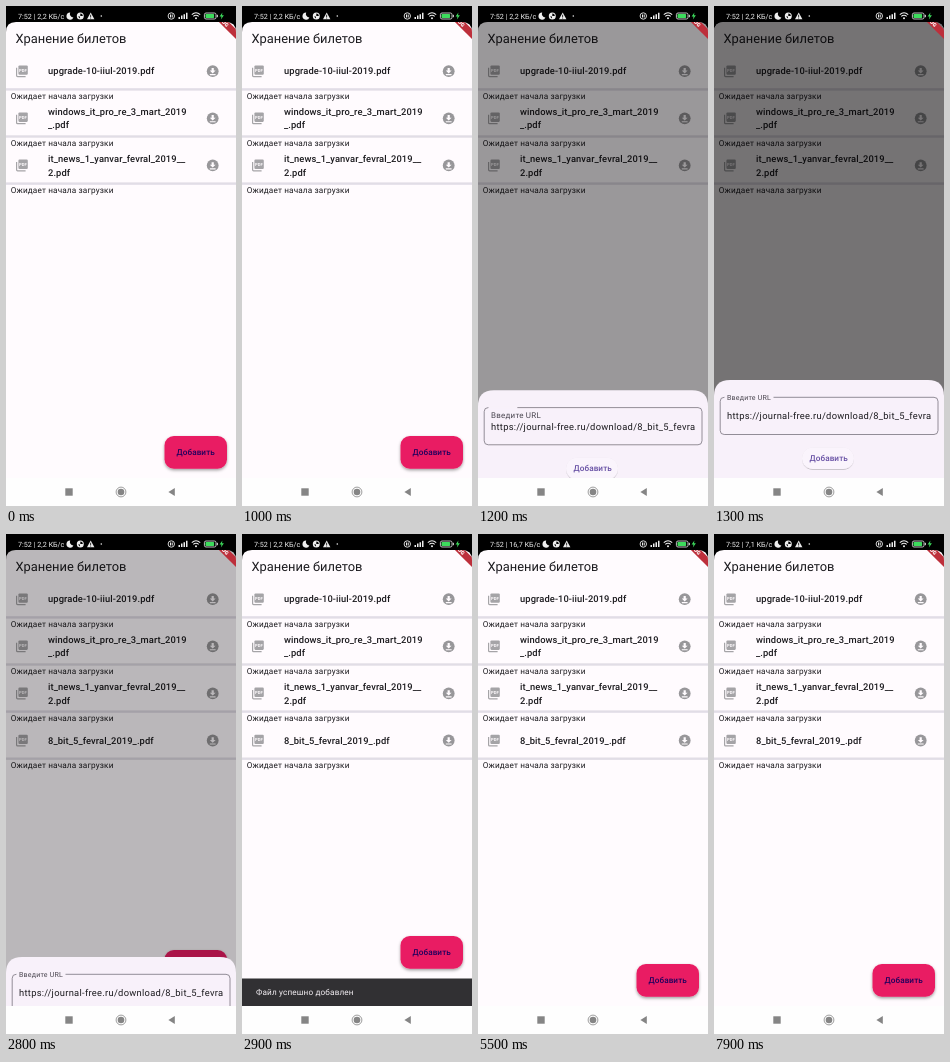
These frames come from a looping animation (230 px wide and 500 px high, 8000 ms). An HTML page:

```html
<!DOCTYPE html>
<html lang="ru">
<head>
<meta charset="utf-8">
<style>
html, body { margin: 0; width: 100%; height: 100%; overflow: hidden; background: #000; }
svg { display: block; width: 230px; height: 500px; }
text { font: 8.2px Roboto, sans-serif; letter-spacing: .15px; fill: #1c1b1f; white-space: pre; text-rendering: geometricPrecision; }
.title { font-size: 12.9px; letter-spacing: 0; }
.file { font-size: 9.36px; font-weight: 500; letter-spacing: .09px; }
.input { font-size: 9.36px; letter-spacing: .29px; }
.button { font-weight: 500; letter-spacing: .06px; text-anchor: middle; }
.clock { font-size: 7.2px; letter-spacing: 0; fill: #eee; }
.pdf { font-size: 4.2px; font-weight: 700; letter-spacing: 0; fill: #fffbfe; }
.debug { font-size: 5.2px; font-weight: 900; letter-spacing: 0; fill: #fff; text-anchor: middle; }
</style>
</head>
<body>
<svg viewBox="0 0 230 500">
  <defs>
    <clipPath id="screen"><path d="M0 472V26Q0 16 10 16H220Q230 16 230 26V472Z"/></clipPath>
    <clipPath id="inputClip"><rect x="12" y="392" width="206" height="36"/></clipPath>
    <filter id="shadow" x="-20%" y="-30%" width="140%" height="180%">
      <feDropShadow dx="0" dy="1.5" stdDeviation="1.6" flood-opacity=".38"/>
    </filter>
    <filter id="softShadow" x="-20%" y="-30%" width="140%" height="180%">
      <feDropShadow dx="0" dy=".6" stdDeviation=".7" flood-opacity=".3"/>
    </filter>
    <g id="pdfIcon">
      <rect x="12.4" y="-5.8" width="9.4" height="9.4" rx="1.1" fill="#a5a4a7"/>
      <path d="M10.6 -3.5V4.4Q10.6 5.4 11.6 5.4H19.6" fill="none" stroke="#a5a4a7" stroke-width="1.2"/>
      <text class="pdf" x="13.1" y=".5">PDF</text>
    </g>
    <g id="loadIcon">
      <circle r="5.9" fill="#98979a"/>
      <path d="M-1.1 -3.2H1.1V-.6H2.9L0 2.2L-2.9 -.6H-1.1ZM-2.9 2.9H2.9V4H-2.9Z" fill="#fffbfe"/>
    </g>
  </defs>

  <rect width="230" height="500" fill="#000"/>
  <rect y="472" width="230" height="28" fill="#fefefe"/>

  <g clip-path="url(#screen)">
    <rect y="16" width="230" height="456" fill="#fffbfe"/>
    <text class="title" x="9.5" y="37">Хранение билетов</text>
    <g id="list"></g>
    <g id="snack">
      <rect y="444.5" width="230" height="28" fill="#313033"/>
      <text x="14" y="461.3" style="fill:#f4eff4">Файл успешно добавлен</text>
    </g>
    <g id="fab">
      <rect x="158.5" y="430" width="62.5" height="32.7" rx="9.4" fill="#e91e63" filter="url(#shadow)"/>
      <text class="button" x="189.7" y="449.3" style="fill:#21005d">Добавить</text>
    </g>
    <rect id="scrim" y="16" width="230" height="456" fill="#000"/>
    <g id="sheet">
      <path d="M0 480V390Q0 374 16 374H214Q230 374 230 390V480Z" fill="#f8f1fa"/>
      <rect x="6.2" y="391.3" width="217.8" height="37.2" rx="4" fill="none" stroke="#79747e" stroke-width=".8"/>
      <rect id="gap" x="10.5" y="390" width="49" height="3" fill="#f8f1fa"/>
      <text class="input" x="13" y="413.3" clip-path="url(#inputClip)">https://journal-free.ru/download/8_bit_5_fevral</text>
      <text id="label" class="input" x="13" style="fill:#49454f">Введите URL</text>
      <rect x="88" y="441.5" width="52" height="21.5" rx="10.75" fill="#faf4fc" filter="url(#softShadow)"/>
      <text class="button" x="114.7" y="455" style="fill:#6750a4">Добавить</text>
    </g>
    <g transform="translate(230 0) rotate(45)">
      <rect x="-24" y="16.4" width="48" height="7" fill="#bd2f3b"/>
      <text class="debug" y="21.8">DEBUG</text>
    </g>
  </g>

  <text id="clock" class="clock" x="12" y="12.6"></text>
  <g id="notices" fill="#eee">
    <path d="M64.2 6.4A3.6 3.6 0 1 0 67.4 11.4A3.5 3.5 0 0 1 64.2 6.4Z"/>
    <circle cx="74.3" cy="10" r="3.5"/>
    <path d="M74.3 7.5V10H76.8A2.5 2.5 0 0 0 74.3 7.5ZM72 10.6H74V12.4Z" fill="#000"/>
    <path d="M84.7 6.4L88.4 13.2H81Z"/>
    <path d="M84.3 8.8H85.1V11H84.3ZM84.3 11.6H85.1V12.4H84.3Z" fill="#000"/>
    <circle id="dot" cx="95.3" cy="10" r=".8"/>
  </g>
  <g fill="#eee">
    <circle cx="165.3" cy="10" r="3.2" fill="none" stroke="#eee" stroke-width=".9"/>
    <path d="M164 8.4H165V11.6H164ZM165.7 8.4H166.7V11.6H165.7Z"/>
    <path d="M172.5 11H174V13H172.5ZM175 9.6H176.5V13H175ZM177.5 8.2H179V13H177.5ZM180 6.8H181.5V13H180Z"/>
    <g fill="none" stroke="#eee" stroke-width="1.1">
      <path d="M185.8 8.6Q190 4.8 194.2 8.6M187.3 10.4Q190 8 192.7 10.4"/>
      <rect x="198.4" y="7" width="11.6" height="6" rx="1.6" stroke-width=".8"/>
    </g>
    <circle cx="190" cy="12.2" r="1"/>
    <rect x="199.5" y="8.1" width="8.6" height="3.8" rx=".7" fill="#3ddb5c"/>
    <rect x="210.8" y="8.8" width="1" height="2.4"/>
    <path d="M216.4 6.4L213.6 10.6H215.5L214.9 13.6L217.9 9.2H216Z" fill="#3ddb5c"/>
  </g>

  <g fill="#858585">
    <rect x="59.3" y="482.3" width="7.4" height="7.4"/>
    <circle cx="115" cy="486" r="3.3"/>
    <circle cx="115" cy="486" r="4.9" fill="none" stroke="#858585" stroke-width=".8"/>
    <path d="M168.8 482V490L162.4 486Z"/>
  </g>
</svg>
<script>
const $ = id => document.getElementById(id);
const LOOP = 8000, STEP = 100, ROW = 47.1, SHEET = 98, SNACK = 28;

const files = [
  ['upgrade-10-iiul-2019.pdf'],
  ['windows_it_pro_re_3_mart_2019', '_.pdf'],
  ['it_news_1_yanvar_fevral_2019__', '2.pdf'],
  ['8_bit_5_fevral_2019_.pdf']
];

$('list').innerHTML = files.map((lines, i) => {
  const first = lines.length > 1 ? -3.8 : 3.2;
  const names = lines.map((s, n) => `<text class="file" x="42" y="${first + n * 14}">${s}</text>`);
  return `<g transform="translate(0 ${65.2 + i * ROW})">
    <use href="#pdfIcon"/><use href="#loadIcon" x="206.7"/>${names.join('')}
    <rect y="17" width="230" height="2.4" fill="#e1dde6"/>
    <text x="4.7" y="27.8">Ожидает начала загрузки</text></g>`;
}).join('');
const newRow = $('list').lastElementChild;

const ramp = (t, from, to) => Math.min(1, Math.max(0, (t - from) / (to - from)));
const easeOut = u => 1 - (1 - u) ** 1.4;
const shift = (el, x, y) => el.setAttribute('transform', `translate(${x} ${y})`);

function draw(t) {
  // Bottom sheet with its scrim
  const opening = ramp(t, 1000, 1250), closing = ramp(t, 2700, 2900);
  shift($('sheet'), 0, SHEET * (1 - easeOut(opening) + closing));
  $('scrim').setAttribute('opacity', .54 * opening ** 1.4 * (1 - closing));

  // Field label floats up onto the border
  const float = ramp(t, 1100, 1270);
  $('label').setAttribute('y', 413.3 - 19.6 * float);
  $('label').style.fontSize = 9.36 - 2.34 * float + 'px';
  $('label').style.letterSpacing = .29 - .07 * float + 'px';
  $('gap').setAttribute('width', 49 * float);

  // Snack bar pushes the button up
  const snack = ramp(t, 2700, 2900) * (1 - ramp(t, 4950, 5200));
  shift($('snack'), 0, SNACK * (1 - snack));
  shift($('fab'), 0, -SNACK * snack);
  newRow.style.display = t < 2800 ? 'none' : '';

  const speed = t < 3200 ? '2,2' : t < 7100 ? '16,7' : '7,1';
  const wide = speed.length > 3;
  $('clock').textContent = `7:52 | ${speed} КБ/с`;
  shift($('notices'), wide ? 4 : 0, 0);
  $('dot').style.display = wide ? 'none' : '';
}

function tick() {
  const t = performance.now() % LOOP;
  draw(Math.floor(t / STEP) * STEP);
  requestAnimationFrame(tick);
}
tick();
</script>
</body>
</html>
```
